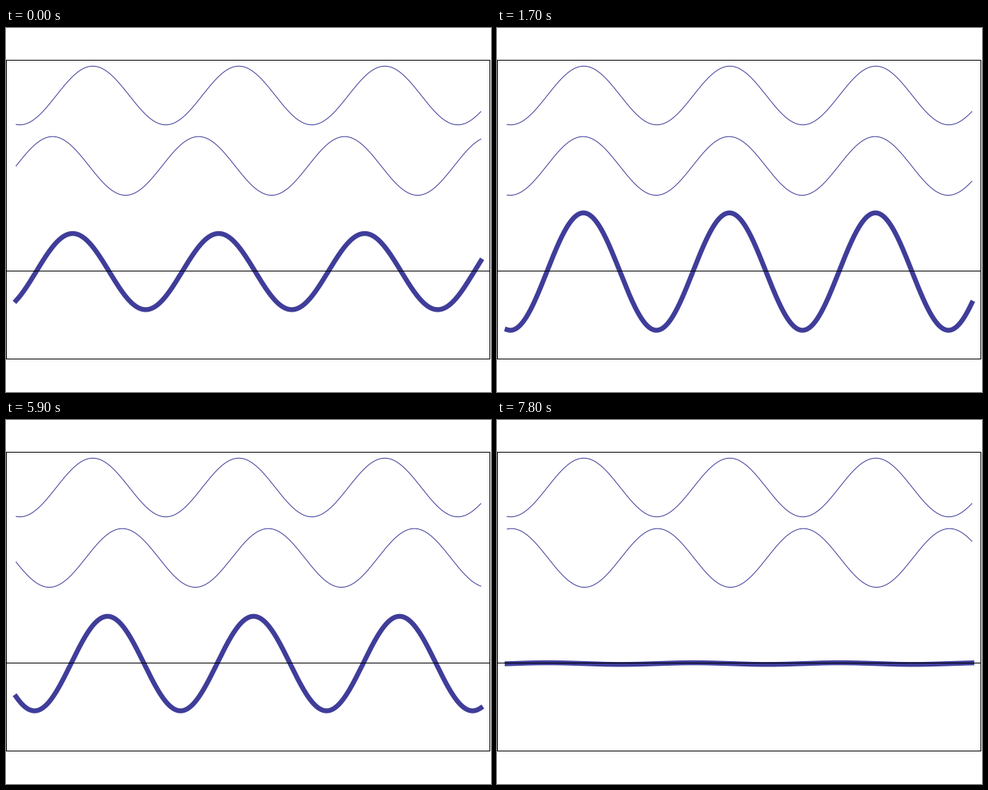
Recreate the animation shown at these times as a matplotlib script. Size 640 by 480 pixels, loop 8000 ms.

```python
import numpy as np
import matplotlib.pyplot as plt
from matplotlib.animation import FuncAnimation
from matplotlib.patches import Rectangle

WIDTH, HEIGHT, DPI = 640, 480, 100
FRAMES, INTERVAL = 80, 100
BLUE = (0.2472, 0.24, 0.6)

LEFT, X_SCALE = 13.3, 30.665
AMPLITUDE = 38.7
SUM_Y = 321.2
TOP_Y, MIDDLE_Y = SUM_Y - 6 * AMPLITUDE, SUM_Y - 3.6 * AMPLITUDE
FIXED_PHASE = 1.73
PHASE_STEP = 0.1
HOLD_START, HOLD_LENGTH, LAST_STEP = 17, 29, 49


def px(size):
    return size * 72 / DPI


fig = plt.figure(figsize=(WIDTH / DPI, HEIGHT / DPI), dpi=DPI, facecolor="white")
ax = fig.add_axes([0, 0, 1, 1])
ax.set_xlim(0, WIDTH)
ax.set_ylim(HEIGHT, 0)
ax.axis("off")

x = np.linspace(0, 20, 800)
screen_x = LEFT + X_SCALE * x
fixed = np.sin(x - FIXED_PHASE)


def add_wave(width):
    return ax.plot(screen_x, np.zeros_like(x), color=BLUE, lw=px(width),
                   solid_capstyle="projecting", snap=False)[0]


def add_bar(left, top, width, height):
    ax.add_patch(Rectangle((left, top), width, height, fc="black", lw=0,
                           snap=False, zorder=5))


fixed_wave, moving_wave = add_wave(1), add_wave(1)
sum_wave = add_wave(6.4)
fixed_wave.set_ydata(TOP_Y - AMPLITUDE * fixed)

# Border and axis lie above the curves, one whole pixel thick.
for row in (42, 320, 436):
    add_bar(0, row, 639, 1)
for column in (0, 638):
    add_bar(column, 42, 1, 395)


def phase_at(frame):
    """Phase advances steadily, pausing while the two waves coincide."""
    if frame > HOLD_START:
        frame = max(HOLD_START, frame - HOLD_LENGTH)
    return PHASE_STEP * min(frame, LAST_STEP)


def update(frame):
    moving = np.sin(x - phase_at(frame))
    moving_wave.set_ydata(MIDDLE_Y - AMPLITUDE * moving)
    sum_wave.set_ydata(SUM_Y - AMPLITUDE * (fixed + moving))
    return moving_wave, sum_wave


anim = FuncAnimation(fig, update, frames=FRAMES, interval=INTERVAL,
                     repeat=True, repeat_delay=0)
plt.show()
```
